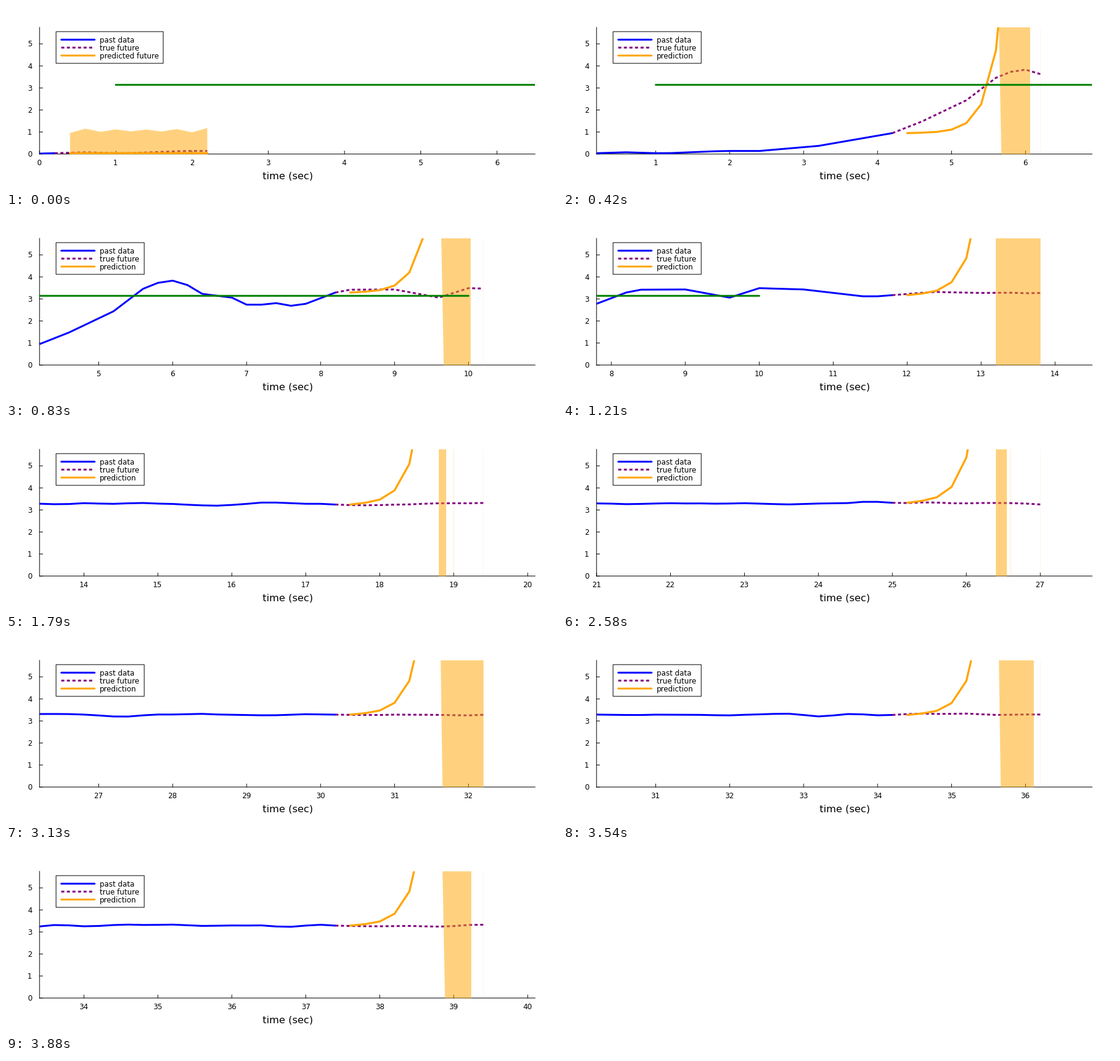
Recreate the animation shown at these times as a matplotlib script. Size 900 px wide and 300 px high, loop 3.93 s.

```python
import numpy as np
import matplotlib.pyplot as plt
from matplotlib.animation import FuncAnimation
from matplotlib.patches import Polygon, Rectangle

plt.rcParams["font.family"] = "DejaVu Sans"

W, H, DPI = 900, 300, 100
LEFT, RIGHT, TOP, BOTTOM = 54.8, 864.2, 35, 242.7
Y_MAX = 5.75
PT = 72 / DPI                      # points per pixel
LOOP, TICK = 3930, 10              # ms
STEPS, FPS = 94, 24
DT, HORIZON = 0.2, 10
LEARNED = 10                       # first step with a diverging forecast

# Start of each step, rounded to the 10 ms clock
STARTS = np.floor(np.arange(STEPS) * 1000 / FPS / TICK + 0.5)

# Swing-up and overshoot (time, angle); afterwards the angle only jitters
SWING = [(0, .02), (.6, .08), (1.1, .03), (1.9, .14), (2.4, .14), (3.2, .37),
         (4.2, .95), (4.6, 1.48), (5.2, 2.44), (5.6, 3.46), (5.8, 3.73),
         (6, 3.83), (6.2, 3.63), (6.4, 3.23), (6.8, 3.06), (7, 2.74),
         (7.2, 2.74), (7.4, 2.81), (7.6, 2.69), (7.8, 2.78), (8.2, 3.29),
         (8.4, 3.42), (9, 3.43), (9.6, 3.06), (10, 3.49), (10.6, 3.43),
         (11.4, 3.12), (11.6, 3.12), (12.4, 3.33)]
SETTLED, RATE = 3.28, 2.87

# Forecast keys: step, growth of the error, left and right edge of the bar
KEYS = np.array([(0, 0, 1.45, 1.9), (20, .0385, 1.435, 1.83),
                 (29, .071, 1.4, 2), (43, .078, 1.4, 1.495),
                 (62, .087, 1.4, 1.545), (75, .065, 1.425, 2),
                 (93, .0655, 1.445, 1.835)])

times = DT * np.arange(2 * STEPS + HORIZON)
rng = np.random.default_rng(4)
jitter = np.convolve(rng.normal(0, .03, times.size), [.5, .8, .5], "same")
swing_t, swing_v = zip(*SWING)
angle = np.where(times < swing_t[-1], np.interp(times, swing_t, swing_v),
                 SETTLED + jitter)

# Zigzag width of the untrained forecast, larger towards both ends
k = np.arange(HORIZON)
prior = 1.03 - (-1.0) ** k * (.04 + .07 * (k / 4.5 - 1) ** 2)

fig = plt.figure(figsize=(W / DPI, H / DPI), dpi=DPI, facecolor="white")
ax = fig.add_axes([0, 0, 1, 1])
ax.set_xlim(0, W)
ax.set_ylim(H, 0)
ax.axis("off")
clip = Rectangle((LEFT, TOP), RIGHT - LEFT, BOTTOM - TOP, transform=ax.transData)


def ypos(v):
    return BOTTOM - np.asarray(v) * (BOTTOM - TOP) / Y_MAX


def stroke(xs, ys, color="black", width=1.0, z=1, clipped=False, **kw):
    line, = ax.plot(xs, ys, color=color, lw=width * PT, zorder=z, snap=False, **kw)
    if clipped:
        line.set_clip_path(clip)
    return line


def label(x, y, text, size=11.9, **kw):
    """Text whose capitals are centred on y."""
    return ax.text(x, y + .365 * size, text, fontsize=size * PT,
                   va="baseline", **kw)


# Axes
stroke([LEFT, RIGHT], [BOTTOM] * 2)
stroke([LEFT] * 2, [TOP, BOTTOM])
for v in range(6):
    stroke([LEFT, LEFT + 5], [ypos(v)] * 2)
    label(42.5, ypos(v), str(v), ha="right", zorder=1)
label((LEFT + RIGHT) / 2 + .5, 277.4, "time (sec)", 16.4, ha="center")
xticks = [(stroke([0, 0], [BOTTOM - 5, BOTTOM]), label(0, 256.6, "", ha="center"))
          for _ in range(8)]

# Series
ROUND = dict(solid_capstyle="round", solid_joinstyle="round")
DASH = dict(dashes=(5 / 3, 4.1 / 3), dash_capstyle="butt")
past = stroke([], [], "blue", 3, 2, True, **ROUND)
future = stroke([], [], "purple", 3, 3, True, **DASH)
band = Polygon([(0, 0)] * 3, fc="orange", alpha=.5, lw=0, zorder=4)
ax.add_patch(band)
band.set_clip_path(clip)
# Faint spikes right of the bar: (line, offset, shown while the bar ends before)
spikes = [(stroke([], [], "orange", 1, 4, True, alpha=a), offset, end)
          for offset, end, a in [(1.6, 1.55, .2), (2, 1.95, .1)]]
forecast = stroke([], [], "orange", 3.3, 5, True, **ROUND)
goal = stroke([], [], "green", 3, 6, True, **ROUND)

# Legend
box = Rectangle((81.8, 42), 175, 52, fc="white", ec="black", lw=PT, zorder=7,
                snap=False)
ax.add_patch(box)
names = []
for row, (color, name, style) in enumerate([("blue", "past data", ROUND),
                                            ("purple", "true future", DASH),
                                            ("orange", "", ROUND)]):
    y = 55.2 + 13 * row
    stroke([90.3, 144.8], [y, y], color, 3, 8, **style)
    names.append(label(152.7, y + .4, name, zorder=8))


def draw(clock):
    step = int(np.searchsorted(STARTS, clock, side="right")) - 1
    early = step < LEARNED
    now = 1 + 2 * step
    t = times[now]
    lo, hi = max(0, t - 4), max(6.5, t + 2.7)
    growth, start, end = (np.interp(step, KEYS[:, 0], col) for col in KEYS.T[1:])

    def xpos(s):
        return LEFT + (np.asarray(s) - lo) * (RIGHT - LEFT) / (hi - lo)

    first = int(np.ceil(lo - 1e-6))
    for s, (mark, text) in enumerate(xticks, first):
        shown = s <= hi + 1e-6
        mark.set_visible(shown)
        text.set_visible(shown)
        mark.set_xdata([xpos(s)] * 2)
        text.set_x(xpos(s) - .4)
        text.set_text(str(s))

    ahead = slice(now, now + HORIZON + 1)
    past.set_data(xpos(times[:now + 1]), ypos(angle[:now + 1]))
    future.set_data(xpos(times[ahead]), ypos(angle[ahead]))
    goal.set_data(xpos([1, 10]), ypos([np.pi] * 2))

    error = np.where(k > 0, growth * RATE ** (k - 1.0), 0)
    mean = np.minimum(angle[now] + error, 60)
    xs = xpos(times[now + 1:now + HORIZON + 1])
    forecast.set_data(xs, ypos(mean))

    if early:
        spread = prior * .65 ** step
        upper = np.column_stack([xs, ypos(mean + spread)])
        lower = np.column_stack([xs, ypos(mean - spread)])
        band.set_xy(np.vstack([upper, lower[::-1]]))
    else:
        foot = start + .8 * (start - 1.4)
        a, b, c = xpos(t + np.array([start, foot, end]))
        band.set_xy([(a, TOP), (c, TOP), (c, BOTTOM), (b, BOTTOM)])

    for line, offset, limit in spikes:
        line.set_visible(not early and end < limit)
        line.set_data([xpos(t + offset)] * 2, [TOP, BOTTOM])

    box.set_width(175 if early else 144)
    names[2].set_text("predicted future" if early else "prediction")
    return []


anim = FuncAnimation(fig, draw, frames=LOOP // TICK, interval=TICK,
                     init_func=lambda: draw(0), repeat=True, repeat_delay=0,
                     cache_frame_data=False)
plt.show()
```
